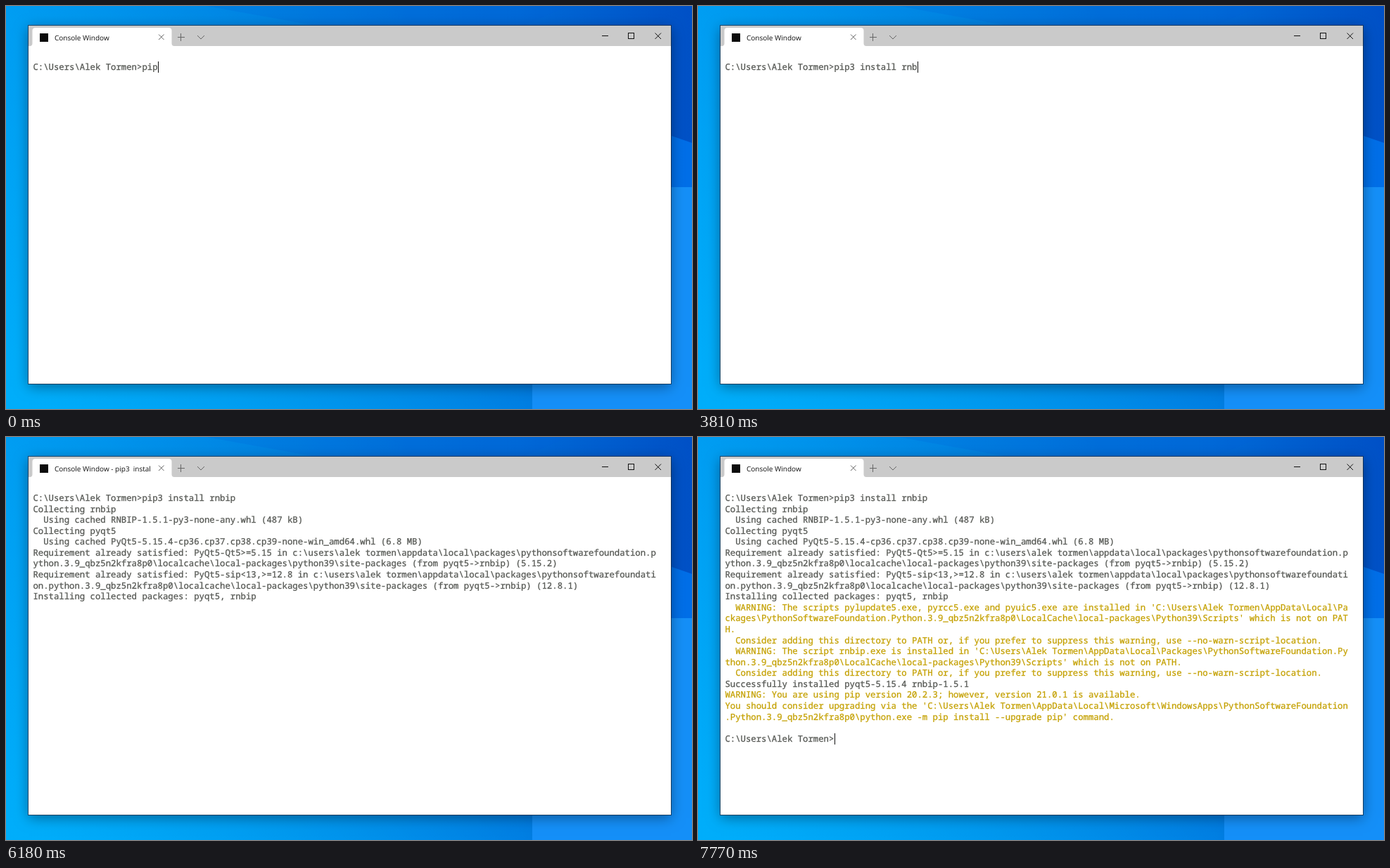
Animation, 975 px wide and 574 px high, one loop 8 s. Source, as an HTML page with a canvas:

```html
<!DOCTYPE html>
<html lang="en">
<head>
<meta charset="utf-8">
<title>Terminal</title>
<style>
  html, body { margin: 0; width: 100%; height: 100%; overflow: hidden; }
  #stage { position: relative; width: 975px; height: 574px; overflow: hidden; text-rendering: geometricPrecision; }
  canvas { position: absolute; left: 0; top: 0; }
  #title {
    position: absolute; left: 69px; top: 37px; width: 139px; overflow: hidden;
    font: 10px/16px "Open Sans", sans-serif; color: #111; white-space: pre;
  }
  .row {
    position: absolute; left: 38.45px; height: 16px; white-space: pre; color: #555753;
    font: 12.317px/16px "Noto Sans Mono", monospace; font-variant-ligatures: none;
    -webkit-text-stroke: 0.3px;
  }
  .warn { color: #c4a000; }
  #caret { position: absolute; width: 1px; height: 16px; background: #111; }
</style>
</head>
<body>
<div id="stage">
  <canvas id="desk" width="975" height="574"></canvas>
  <div id="title"></div>
  <div id="caret"></div>
</div>
<script>
const LOOP = 8000, CELL = 7.39, PITCH = 15.58, LEFT = 38.45, TOP = 79;
const PROMPT = String.raw`C:\Users\Alek Tormen>`;

// Lines starting with "!" are warnings
const OUTPUT = String.raw`Collecting rnbip
  Using cached RNBIP-1.5.1-py3-none-any.whl (487 kB)
Collecting pyqt5
  Using cached PyQt5-5.15.4-cp36.cp37.cp38.cp39-none-win_amd64.whl (6.8 MB)
Requirement already satisfied: PyQt5-Qt5>=5.15 in c:\users\alek tormen\appdata\local\packages\pythonsoftwarefoundation.p
ython.3.9_qbz5n2kfra8p0\localcache\local-packages\python39\site-packages (from pyqt5->rnbip) (5.15.2)
Requirement already satisfied: PyQt5-sip<13,>=12.8 in c:\users\alek tormen\appdata\local\packages\pythonsoftwarefoundati
on.python.3.9_qbz5n2kfra8p0\localcache\local-packages\python39\site-packages (from pyqt5->rnbip) (12.8.1)
Installing collected packages: pyqt5, rnbip
!  WARNING: The scripts pylupdate5.exe, pyrcc5.exe and pyuic5.exe are installed in 'C:\Users\Alek Tormen\AppData\Local\Pa
!ckages\PythonSoftwareFoundation.Python.3.9_qbz5n2kfra8p0\LocalCache\local-packages\Python39\Scripts' which is not on PAT
!H.
!  Consider adding this directory to PATH or, if you prefer to suppress this warning, use --no-warn-script-location.
!  WARNING: The script rnbip.exe is installed in 'C:\Users\Alek Tormen\AppData\Local\Packages\PythonSoftwareFoundation.Py
!thon.3.9_qbz5n2kfra8p0\LocalCache\local-packages\Python39\Scripts' which is not on PATH.
!  Consider adding this directory to PATH or, if you prefer to suppress this warning, use --no-warn-script-location.
Successfully installed pyqt5-5.15.4 rnbip-1.5.1
!WARNING: You are using pip version 20.2.3; however, version 21.0.1 is available.
!You should consider upgrading via the 'C:\Users\Alek Tormen\AppData\Local\Microsoft\WindowsApps\PythonSoftwareFoundation
!.Python.3.9_qbz5n2kfra8p0\python.exe -m pip install --upgrade pip' command.
`.split('\n');

// [time, typed keys]; "<" is backspace
const KEYS = [
  [0, 'pip'], [410, '3'], [670, ' '], [1120, 'i'], [1260, 'ns'], [1540, 'r'],
  [1990, '<'], [2160, 't'], [2330, 'a'], [2510, 'l'], [2680, 'l'], [2850, ' '],
  [3300, 'r'], [3640, 'n'], [3810, 'b'], [4130, 'ip']
];
// [time, rows on screen]
const PRINTS = [
  [0, 0], [4420, 1], [5030, 3], [5160, 7], [5300, 10],
  [6590, 14], [6910, 17], [7050, 18], [7190, 22]
];
const CARET_OFF = [[5030, 5600], [6180, 6740], [7190, 7770]];
const RUN_START = 4420, RUN_END = 7190;

const stage = document.getElementById('stage');
const title = document.getElementById('title');
const caret = document.getElementById('caret');
const ctx = document.getElementById('desk').getContext('2d');

const rowY = r => TOP + Math.round(r * PITCH);

function addRow(text, r) {
  const el = document.createElement('div');
  const warn = text[0] === '!';
  el.className = warn ? 'row warn' : 'row';
  el.style.top = rowY(r) + 'px';
  el.textContent = warn ? text.slice(1) : text;
  stage.insertBefore(el, caret);
  return el;
}
const rows = [PROMPT, ...OUTPUT, PROMPT].map(addRow);

function typed(t) {
  let s = '';
  for (const [at, key] of KEYS) {
    if (at <= t) s = key === '<' ? s.slice(0, -1) : s + key;
  }
  return s;
}

function show(t) {
  const line = PROMPT + typed(t);
  const count = PRINTS.filter(p => p[0] <= t).pop()[1];
  const done = t >= RUN_END;
  if (rows[0].textContent !== line) rows[0].textContent = line;
  rows.forEach((el, r) => {
    el.style.visibility = r === 0 || r < count || done ? 'visible' : 'hidden';
  });
  const name = t >= RUN_START && !done ? 'Console Window - pip3  instal' : 'Console Window';
  if (title.textContent !== name) title.textContent = name;

  const col = done ? PROMPT.length : count ? 0 : line.length;
  caret.style.left = Math.round(LEFT + col * CELL) + 'px';
  caret.style.top = rowY(count) + 'px';
  caret.style.visibility = CARET_OFF.some(([a, b]) => t >= a && t < b) ? 'hidden' : 'visible';
}

function gradient(x0, y0, x1, y1, stops) {
  const g = ctx.createLinearGradient(x0, y0, x1, y1);
  stops.forEach(([at, color]) => g.addColorStop(at, color));
  return g;
}

function poly(points, fill) {
  ctx.beginPath();
  points.forEach(([x, y]) => ctx.lineTo(x, y));
  ctx.closePath();
  ctx.fillStyle = fill;
  ctx.fill();
}

function lines(color, ...paths) {
  ctx.strokeStyle = color;
  ctx.lineWidth = 1;
  ctx.beginPath();
  for (const path of paths) {
    path.forEach(([x, y], i) => i ? ctx.lineTo(x, y) : ctx.moveTo(x, y));
  }
  ctx.stroke();
}

function drawWallpaper() {
  ctx.fillStyle = gradient(0, 0, 975, 0, [
    [0, '#008ae8'], [0.4, '#0079dd'], [0.75, '#006ad8'], [1, '#0050c6']
  ]);
  ctx.fillRect(0, 0, 975, 574);
  ctx.fillStyle = gradient(620, 60, 60, 574, [[0, 'rgba(0,182,255,0)'], [1, 'rgba(0,182,255,.8)']]);
  ctx.fillRect(0, 0, 975, 574);
  poly([[285, 0], [800, 0], [735, 28], [440, 28]], 'rgba(0,95,215,.2)');
  poly([[946, 185], [975, 195], [975, 260], [946, 260]], 'rgba(0,130,255,.6)');
  ctx.fillStyle = '#148ff8';
  ctx.fillRect(748, 258, 316, 316);
}

function drawWindow() {
  ctx.save();
  ctx.shadowColor = 'rgba(0,0,0,.4)';
  ctx.shadowBlur = 18;
  ctx.shadowOffsetY = 4;
  ctx.fillStyle = '#fff';
  ctx.fillRect(32, 28, 913, 510);
  ctx.restore();
  ctx.fillStyle = '#cacaca';
  ctx.fillRect(32, 28, 913, 29);

  // Tab with flared feet
  ctx.fillStyle = '#fff';
  ctx.beginPath();
  ctx.moveTo(34, 57);
  ctx.quadraticCurveTo(37.5, 57, 37.5, 53);
  ctx.lineTo(37.5, 35);
  ctx.quadraticCurveTo(37.5, 31, 42, 31);
  ctx.lineTo(231, 31);
  ctx.quadraticCurveTo(235.5, 31, 235.5, 35);
  ctx.lineTo(235.5, 53);
  ctx.quadraticCurveTo(235.5, 57, 239, 57);
  ctx.fill();

  ctx.fillStyle = '#0c0c0c';
  ctx.fillRect(48, 39, 12, 12);

  lines('#666', [[217, 40.5], [224.5, 48]], [[224.5, 40.5], [217, 48]]);
  lines('#666', [[244, 44.5], [254, 44.5]], [[248.5, 39], [248.5, 50]]);
  lines('#666', [[272, 42], [277, 47], [282, 42]]);
  lines('#111', [[847, 42.5], [856, 42.5]]);
  lines('#111', [[922.5, 38.5], [931, 47]], [[931, 38.5], [922.5, 47]]);
  ctx.strokeRect(884.5, 38.5, 8, 8);

  ctx.strokeStyle = 'rgba(20,45,70,.75)';
  ctx.strokeRect(31.5, 27.5, 914, 511);
}

drawWallpaper();
drawWindow();

function tick() {
  show(performance.now() % LOOP);
  requestAnimationFrame(tick);
}
tick();
</script>
</body>
</html>
```
